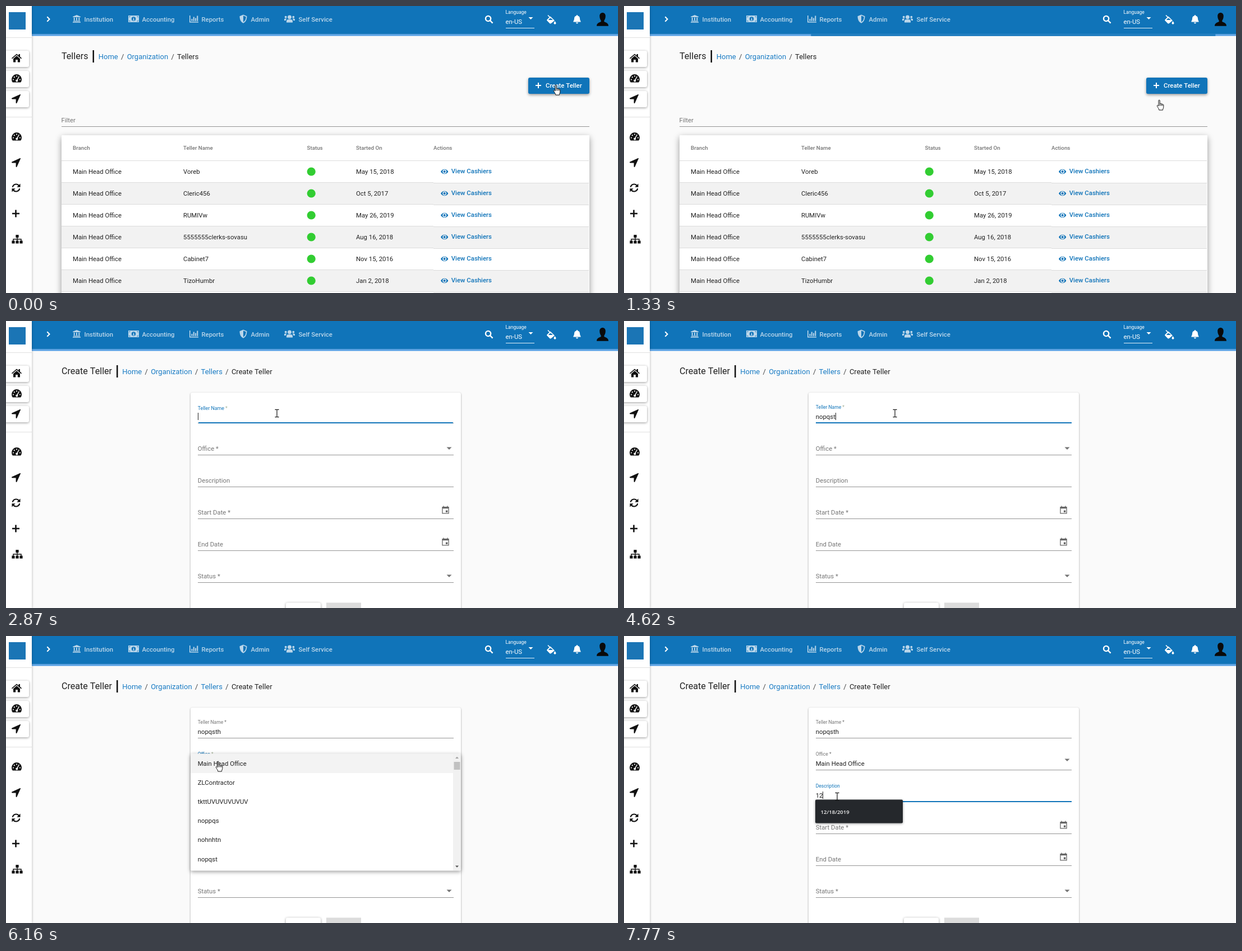
Recreate the animation shown at these times as an HTML page with a canvas. Size 1091x513 px, loop 8 s.

```html
<!DOCTYPE html>
<html lang="en">
<head>
<meta charset="utf-8">
<title>Create a teller</title>
<style>
html, body { margin: 0; width: 100%; height: 100%; overflow: hidden; background: #fafafa; }
canvas { display: block; }
</style>
</head>
<body>
<canvas id="stage" width="1091" height="513"></canvas>
<script>
const c = document.getElementById('stage').getContext('2d');
const LOOP = 8000, STEP = 70;
const BLUE = '#1074b9', TRACK = '#559fe5', INK = '#212121', GREY = '#757575', LINE = '#949494', NAV = '#bad6ea';
const PAGE_AT = 1400;

// ---------- helpers ----------
const clamp = x => Math.max(0, Math.min(1, x));
const mix = (a, b, k) => a + (b - a) * k;
const smooth = x => x * x * (3 - 2 * x);
const out = x => 1 - (1 - x) ** 4;
const ramp = (t, start, length) => clamp((t - start) / length);

// Keys are [position, value]; positions ascend.
function along(keys, x, ease = k => k) {
  let a = keys[0];
  for (const b of keys) {
    if (x < b[0]) return a === b ? b[1] : mix(a[1], b[1], ease((x - a[0]) / (b[0] - a[0])));
    a = b;
  }
  return a[1];
}

function rect(x, y, w, h, color) {
  c.fillStyle = color;
  c.fillRect(x, y, w, h);
}

function card(x, y, w, h, color, blur = 4, dy = 1, r = 3) {
  c.save();
  c.shadowColor = 'rgba(0,0,0,.4)';
  c.shadowBlur = blur;
  c.shadowOffsetY = dy;
  c.fillStyle = color;
  c.beginPath();
  c.roundRect(x, y, w, h, r);
  c.fill();
  c.restore();
}

function text(s, x, y, color = INK, size = 11.375, weight = 400, family = 'Roboto') {
  c.font = `${weight} ${size}px ${family}, sans-serif`;
  c.fillStyle = color;
  c.fillText(s, x, y);
  return c.measureText(s).width;
}

function icon(x, y, color, fill, stroke, width = 1) {
  c.save();
  c.translate(x, y);
  c.fillStyle = c.strokeStyle = color;
  c.lineWidth = width;
  if (fill) c.fill(new Path2D(fill), 'evenodd');
  if (stroke) c.stroke(new Path2D(stroke));
  c.restore();
}

const dot = (x, y, r) => `M${x - r} ${y}a${r} ${r} 0 1 0 ${2 * r} 0a${r} ${r} 0 1 0 ${-2 * r} 0Z`;
const triangle = (x, y, color, r = 4.5) => icon(x, y, color, `M${-r} ${-r / 2}H${r}L0 ${r / 2}Z`);

// ---------- fixed frame ----------
const GAUGE = 'M-7.2 6.5A9 9 0 1 1 7.2 6.5Z' + dot(-6, 1.5, 1.1) + dot(-4.2, -2.8, 1.1) + dot(0, -4.7, 1.1) + dot(6, 1.5, 1.1) +
  'M3.8-4.6L5-4 1.8 2.2A2 2 0 1 1 .5 1.5Z';
const ARROW = 'M8-7.2L1.4 7.4C1 8.3-.4 8.2-.4 7V.4H-7C-8.2.4-8.3-1-7.4-1.4L7-8C7.8-8.3 8.3-7.8 8-7.2Z';

function sidebar() {
  c.save();
  c.shadowColor = 'rgba(0,0,0,.3)';
  c.shadowBlur = 4;
  rect(0, 0, 46, 513, '#fff');
  c.restore();
  rect(5, 11, 30, 31, '#1b75b5');
  rect(0, 56, 46, 1, '#e0e0e0');
  rect(0, 198, 46, 1, '#e0e0e0');
  for (const y of [80, 116, 152]) card(-4, y, 45, 29, '#fff');
  const ink = '#111';
  icon(19, 93, ink, 'M-9 .2L0-7.5 3.5-4.5V-7H6V-2.4L9 .2 8 1.4 0-5.4-8 1.4ZM-6 1.2L0-4 6 1.2V7.5H1.8V3H-1.8V7.5H-6Z');
  icon(19, 130, ink, GAUGE);
  icon(18, 166, ink, ARROW);
  icon(19, 234, ink, GAUGE);
  icon(18, 280, ink, ARROW);
  icon(18, 325, ink, 'M7.5-7.5V-1.3H1.3ZM-7.5 7.5V1.3H-1.3Z', 'M-6.2-1.3A6.3 6.3 0 0 1 5-4M6.2 1.3A6.3 6.3 0 0 1-5 4', 2.2);
  icon(17.5, 371, ink, '', 'M-6.5 0H6.5M0-6.5V6.5', 2.6);
  icon(20, 416.5, ink, 'M-2.6-7.5h5.2v5h-5.2ZM-9.6 3h5.2v5h-5.2ZM-2.6 3h5.2v5h-5.2ZM4.4 3h5.2v5h-5.2Z', 'M0-3V4M-7 4V.2H7V4', 1.4);
}

function header(t) {
  rect(46, 0, 1045, 50.5, BLUE);
  rect(46, 50.5, 1045, 3, TRACK);
  if (t >= 490 && t < PAGE_AT) {
    const p = (t - 383) / 2000;
    const left = along([[0, -.5489], [.25, -.1724], [.4835, .295], [1, 1.054]], p);
    const size = along([[0, .08], [.1915, .457], [.4415, .727], [1, .08]], p);
    const x = Math.max(46, 46 + left * 1045);
    rect(x, 50.5, Math.max(0, 46 + (left + size) * 1045 - x), 3, BLUE);
  }
  icon(75.5, 23.5, '#fff', '', 'M-2.2-4.2L2 0-2.2 4.2', 2);
  icon(126, 23, NAV, 'M0-7L7-4V-3H-7V-4ZM-5.3-2.2h2v5h-2ZM-1-2.2h2v5h-2ZM3.3-2.2h2v5h-2ZM-6 3.3H6V4.5H-6ZM-7 5.2H7V6.7H-7Z');
  icon(227.5, 23, NAV, 'M-9.5-6h19v12h-19ZM-8 2.5V4.5H-5.5ZM-8-2.5V-4.5H-5.5ZM8 2.5V4.5H5.5ZM8-2.5V-4.5H5.5Z' + dot(0, 0, 3.7), 'M0-2V2M-1.4 2H1.4', 1.3);
  icon(335, 23, NAV, 'M-4.5 0h2V4h-2ZM-1.2-3.5h2V4h-2ZM2.1-1.5h2V4h-2ZM5.3-5.5h2V4h-2Z', 'M-7.2-6V5.7H8', 1.6);
  icon(423, 23, NAV, 'M0-7.5L6.5-4.8C6.5 1 4.3 5.6 0 7.7-4.3 5.6-6.5 1-6.5-4.8ZM0-5.7V5.8C3.2 4 4.8.5 4.8-3.7Z');
  icon(505.5, 23, NAV, dot(0, -3, 3.4) + dot(-6.8, -3.2, 2) + dot(6.8, -3.2, 2) +
    'M-5.5 6.5V4C-5.5 2-4 1-2.5 1H2.5C4 1 5.5 2 5.5 4V6.5ZM-9.5 3V1C-9.5-.3-8.5-.7-5-.6-6 .5-6.6 1.5-6.6 3ZM9.5 3V1C9.5-.3 8.5-.7 5-.6 6 .5 6.6 1.5 6.6 3Z');
  const links = [['Institution', 139.5], ['Accounting', 242.5], ['Reports', 348.5], ['Admin', 436.5], ['Self Service', 521.5]];
  for (const [name, x] of links) text(name, x, 27.7, NAV, 11.375, 500);

  icon(861, 24, '#fff', '', dot(-1.4, -1.5, 4.6) + 'M2 2L6.6 6.6', 2.4);
  text('Language', 890.5, 14, '#fff', 8.53);
  text('en-US', 890.5, 31.7, '#fff');
  rect(891, 39, 51, 1, '#e4eff7');
  triangle(935.5, 22, '#fff', 4);
  icon(972, 24, '#fff', 'M-1.5-5.5L6 2-.5 7.3C-1.2 7.8-1.9 7.8-2.5 7.2L-7.4 2.2C-8 1.6-8 .8-7.4.2ZM-1.5-3L-5.3 1H3Z' +
    'M6.5 3C8 5.2 8.6 6 8.6 6.6A2 2 0 0 1 4.5 6.6C4.5 6 5 5.2 6.5 3Z', 'M-6-7.5L-.5-2', 1.6);
  icon(1018, 24, '#fff', 'M-.8-8H.8V-6.7C3.7-6.2 5-4 5-1.5 5 1.8 6.7 2.6 6.7 4.5H-6.7C-6.7 2.6-5 1.8-5-1.5-5-4-3.7-6.2-.8-6.7ZM-2 5.5H2A2 2 0 0 1-2 5.5Z');
  icon(1063.5, 24, '#0a0a0a', 'M-5.3-6C-5.3-14 5.3-14 5.3-6 5.3-1.5 3.5 1 2.8 2V4C5 5.5 10.5 6 10.5 11.8H-10.5C-10.5 6-5 5.5-2.8 4V2C-3.5 1-5.3-1.5-5.3-6Z');
}

function heading(title, barX, crumbs) {
  text(title, 99, 95, INK, 16.1);
  rect(barX, 79, 2.5, 22, '#111');
  let x = barX + 10.2;
  crumbs.forEach((name, i) => {
    const last = i === crumbs.length - 1;
    x += text(name, x, 95, last ? INK : '#1a7cc4', 13) + 5.3;
    if (!last) x += text('/', x, 95, '#444', 13) + 5.3;
  });
}

// ---------- teller list ----------
const rows = [
  ['Voreb', 'May 15, 2018'], ['Cleric456', 'Oct 5, 2017'], ['RUMIVw', 'May 26, 2019'],
  ['5555555clerks-sovasu', 'Aug 16, 2018'], ['Cabinet7', 'Nov 15, 2016'], ['TizoHumbr', 'Jan 2, 2018'], ['', '']
];

function listPage() {
  heading('Tellers', 154.5, ['Home', 'Organization', 'Tellers']);
  card(931, 128, 109, 29, BLUE, 5, 2);
  icon(949, 142, '#fff', '', 'M-5 0H5M0-5V5', 2);
  text('Create Teller', 962, 146, '#fff', 11.375, 500);
  text('Filter', 98.5, 208, GREY);
  rect(99, 215, 941, 1, LINE);

  card(99, 231, 941, 320, '#fff', 12, 4, 1);
  const columns = [['Branch', 119], ['Teller Name', 316], ['Status', 536.5], ['Started On', 624], ['Actions', 762]];
  for (const [name, x] of columns) text(name, x, 257, GREY, 9.75, 500);
  rows.forEach(([name, date], i) => {
    const y = 276 + 39 * i;
    if (i % 2) {
      rect(99, y, 663, 39, '#f2f2f2');
      rect(762, y + 1, 277, 39, '#f2f2f2');
    }
    rect(99, y, 663, 1, '#dcdcdc');
    rect(762, y + (i ? 1 : 0), 277, 1, '#dcdcdc');
    if (!name) return;
    text('Main Head Office', 119, y + 24);
    text(name, 316, y + 24);
    icon(544.2, y + 20, '#32cd32', dot(0, 0, 7.6));
    text(date, 624, y + 24);
    icon(781.7, y + 20, BLUE, 'M-6.7 0C-3.5-5.8 3.5-5.8 6.7 0 3.5 5.8-3.5 5.8-6.7 0Z' + dot(0, 0, 3.4) + dot(0, 0, 2.1));
    text('View Cashiers', 793.7, y + 23.3, BLUE, 11.375, 500);
  });
}

// ---------- teller form ----------
const NAME = 'nopqsth', NOTE = '12';
const typed = (s, times, t) => s.slice(0, times.filter(k => t >= k).length);

const fields = [
  { label: 'Teller Name *', focus: 2700, blur: 5320, caret: true,
    value: t => typed(NAME, [3080, 3500, 3780, 4130, 4410, 4620, 4900], t) },
  { label: 'Office *', focus: 5320, lift: 5670, blur: 6960, select: true, value: t => t >= 6370 ? 'Main Head Office' : '' },
  { label: 'Description', focus: 6960, caret: true, value: t => typed(NOTE, [7140, 7770], t) },
  { label: 'Start Date *', date: true },
  { label: 'End Date', date: true },
  { label: 'Status *', select: true }
];
const options = ['Main Head Office', 'ZLContractor', 'tkttUVUVUVUVUV', 'noppqs', 'nohnhtn', 'nopqst'];

function field(f, y, t) {
  const { focus = Infinity, blur = Infinity, lift = focus } = f;
  const active = t >= focus && t < blur;
  const up = t < lift ? 0 : out(ramp(t, lift, 400));
  const size = mix(11.375, 8.53, up), base = y - mix(7, 25.5, up);
  const [name, star] = f.label.split(' *');
  const w = text(name, 341.7, base, active ? BLUE : GREY, size);
  if (star !== undefined) text(' *', 341.7 + w, base, active ? '#a3b095' : GREY, size);

  rect(342, y, 456, 1, LINE);
  if (t >= focus) {
    const half = 228 * mix(.5, 1, out(ramp(t, focus, 250)));
    c.globalAlpha = 1 - ramp(t, blur, 200);
    rect(570 - half, y - 1, half * 2, 2, BLUE);
    c.globalAlpha = 1;
  }
  const value = f.value ? f.value(t) : '';
  const vw = text(value, 341.7, y - 7.5);
  if (f.caret && active) rect(Math.round(341.7 + vw), y - 18, 1, 13, INK);
  if (f.select) triangle(790, y - 11.3 - 6 * up, active ? BLUE : GREY);
  if (f.date) icon(783.5, y - 15.5, '#666', 'M-6.2-5.5H-4V-7H-2.6V-5.5H2.6V-7H4V-5.5H6.2V7H-6.2ZM-4.9-2.2V5.7H4.9V-2.2ZM.4 1H3.8V4.4H.4Z');
}

function dropdown(t) {
  const open = out(ramp(t, 5690, 210)), shown = open * (1 - ramp(t, 6350, 150));
  if (!shown) return;
  c.save();
  c.globalAlpha = shown;
  c.translate(0, 227);
  c.scale(1, mix(.8, 1, open));
  c.translate(0, -227);
  card(329, 210.5, 482, 209, '#fff', 7, 2, 2);
  rect(329, 211, 468, 34, '#f3f3f3');
  options.forEach((name, i) => text(name, 341.7, 231.5 + 34.2 * i));
  rect(797, 211, 14, 208, '#f1f1f1');
  rect(798.5, 225, 11, 14, '#c1c1c1');
  icon(804, 217.5, '#a0a0a0', 'M-3 1.5L0-1.8 3 1.5Z');
  icon(804, 412, '#505050', 'M-3-1.5L0 1.8 3-1.5Z');
  c.restore();
}

function formPage(t) {
  heading('Create Teller', 197, ['Home', 'Organization', 'Tellers', 'Create Teller']);
  card(329, 128, 482, 430, '#fff', 3, 1);
  fields.forEach((f, i) => field(f, 182 + 57 * i, t));
  card(499, 503.5, 62, 30, '#fff');
  text('Cancel', 513, 520.5, INK, 11.375, 500);
  rect(571, 503.5, 62, 30, '#dcdcdc');
  text('Submit', 584, 520.5, '#999', 11.375, 500);
  dropdown(t);
  if (t >= 7140) {
    card(341, 292.5, 156, 42, '#25282c', 4, 1, 2);
    text('12/18/2019', 350.5, 317.5, '#f0f0f0', 9.6, 600, "'Open Sans'");
  }
}

// ---------- pointer ----------
const pathX = [[490, 982], [1330, 956], [2100, 650], [2660, 483], [4970, 483], [5460, 380]];
const pathY = [[490, 150], [1330, 177], [2100, 232], [2660, 165], [4970, 165], [5460, 224], [5670, 224],
  [6160, 233], [6370, 233], [6580, 237], [6700, 237], [6960, 287]];

function pointer(t) {
  const x = along(pathX, t, smooth), y = along(pathY, t, smooth);
  if (t < PAGE_AT || (t > 5180 && t < 6790)) {
    const hand = 'M-3-8C-3-9.3-.8-9.3-.8-8V-2.5C.2-3.2 1.4-2.9 1.6-2 2.6-2.5 3.6-2.1 3.8-1.2 4.9-1.6 5.8-1 5.8 0V3.5C5.8 5.5 4.5 6.5 4.5 9H-2.2C-2.2 6.5-4.5 4.5-5.6 1.8-6 .5-4.6-.2-3.7.9L-3 1.8Z';
    icon(x, y, '#fff', hand);
    icon(x, y, '#111', '', hand + 'M-.8-2.5V1.5M1.6-2V1.5M3.8-1.2V1.5', 1);
  } else if (t < 2170) {
    const arrow = 'M0 0V15L3.5 11.8 6 17 8.2 16 5.8 11H10.5Z';
    icon(x, y, '#fff', arrow);
    icon(x, y, '#111', '', arrow, 1);
  } else {
    icon(x, y, '#111', '', 'M-3.5-6.7H-1L0-6 1-6.7H3.5M0-6V6M-3.5 6.7H-1L0 6 1 6.7H3.5', 1.2);
  }
}

function draw(t) {
  rect(0, 0, 1091, 513, '#fafafa');
  if (t < PAGE_AT) listPage();
  else formPage(t);
  header(t);
  sidebar();
  pointer(t);
}

const start = performance.now();
function tick(now) {
  const t = Math.max(0, now - start) % LOOP;
  draw(Math.floor(t / STEP) * STEP);
  requestAnimationFrame(tick);
}
draw(0);
requestAnimationFrame(tick);
</script>
</body>
</html>
```
